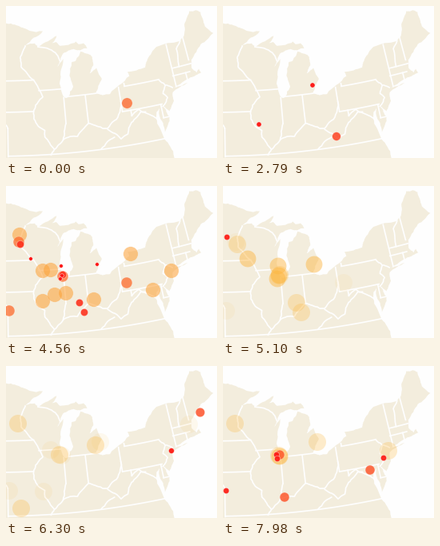
A matplotlib script that plays this animation: 264x190 px, repeating every 8010 ms.

```python
import numpy as np
import matplotlib.pyplot as plt
from matplotlib.animation import FuncAnimation

W, H, DPI = 264, 190, 100
STEP, FRAMES = 30, 267
PX = 72 / DPI
LAND, PAPER = "#f3eddd", "#fefefe"
rng = np.random.default_rng(4)

# Key points as (lon, lat); the small bends between them are random.
LAKES = [
    (-95.1, 49), (-92.9, 48.6), (-91.4, 48.1), (-89.6, 48), (-92.1, 46.75),
    (-90.8, 46.9), (-90.4, 46.57), (-88.9, 47.05), (-87.75, 47.47),
    (-88.45, 46.8), (-87.9, 46.9), (-87.4, 46.5), (-85.2, 46.75),
    (-84.9, 46.47), (-84.2, 46.5), (-83.8, 46), (-84.7, 45.9), (-85.6, 46.08),
    (-87.05, 45.8), (-88, 44.55), (-87.1, 45.25), (-87.55, 44.3), (-87.9, 43),
    (-87.6, 41.85), (-87.3, 41.62), (-86.9, 41.72), (-86.2, 42.6),
    (-86.53, 43.65), (-86.05, 44.9), (-85.55, 44.95), (-85, 45.4),
    (-84.75, 45.78), (-83.5, 45.35), (-83.3, 44.35), (-83.9, 43.65),
    (-82.95, 44.07), (-82.45, 43), (-83.45, 41.72), (-82.7, 41.5),
    (-81.7, 41.5), (-78.9, 42.85), (-79.05, 43.26), (-76.7, 43.35),
    (-76.2, 44.05), (-74.7, 45),
]
OCEAN = [
    (-71.5, 45), (-70.8, 45.4), (-70, 46.7), (-69.23, 47.46), (-68.3, 47.36),
    (-67.8, 47.07), (-67.8, 45.7), (-67, 44.85), (-69, 44.2), (-70.7, 43.05),
    (-70.95, 42.3), (-70.5, 41.78), (-70.1, 42.05), (-69.95, 41.67),
    (-71.4, 41.5), (-73.7, 40.95), (-71.9, 41.07), (-74, 40.55),
    (-74.1, 39.75), (-74.9, 38.93), (-75.5, 39.5), (-75.05, 38.4),
    (-75.95, 37.15), (-76.2, 38.8), (-76, 39.4), (-76.45, 39.1), (-76.3, 37),
    (-75.5, 35.25), (-75.9, 33),
]
RIVERS = [
    # Mississippi, Ohio, Potomac and Delaware
    [(-92.1, 46.7), (-92.85, 45.6), (-92.75, 44.75), (-91.2, 43.5),
     (-90.15, 41.9), (-91.1, 41.2), (-91.4, 39.9), (-90.15, 38.8),
     (-90.2, 38.2), (-89.15, 37), (-89.6, 36.5)],
    [(-89.15, 37), (-88.05, 37.8), (-86.3, 38), (-84.8, 39.1), (-83.6, 38.65),
     (-82.6, 38.4), (-80.85, 39.7), (-80.52, 40.64)],
    [(-79.48, 39.2), (-78.5, 39.65), (-77.05, 38.85), (-76.35, 38)],
    [(-73.9, 41), (-74.7, 41.36), (-75.2, 40.65), (-74.75, 40.2),
     (-75.55, 39.5)],
    # Appalachian ridge, upper Michigan, Wabash, Missouri, Connecticut
    [(-77.75, 39.32), (-78.35, 39.4), (-79.65, 38.6), (-80.3, 37.6),
     (-81.2, 37.25), (-82.6, 38.3)],
    [(-81.95, 37.5), (-83.68, 36.6)],
    [(-90.4, 46.57), (-88.1, 45.9), (-87.6, 45.1)],
    [(-87.53, 39.3), (-88.05, 37.8)],
    [(-94.62, 39.1), (-95.8, 40.58)],
    [(-72.45, 42.73), (-72.3, 43.6), (-71.5, 45)],
    [(-75.35, 42), (-74.7, 41.36)],
]
# (lat, west, east) and (lon, south, north)
PARALLELS = [
    (43.5, -96.5, -91.2), (40.6, -95.8, -91.4), (42.5, -90.6, -87.8),
    (41.75, -87, -83.45), (39.72, -80.52, -75.6), (42, -79.76, -75.35),
    (42.03, -73.5, -71.3), (42.73, -73.25, -70.85), (36.55, -94.62, -75.9),
    (38.45, -75.75, -75.05),
]
MERIDIANS = [
    (-94.62, 36.5, 39.1), (-87.53, 39.3, 41.7), (-84.81, 39.1, 41.7),
    (-80.52, 39.72, 42), (-79.76, 42, 42.27), (-79.48, 39.2, 39.72),
    (-75.75, 38.45, 39.72), (-73.4, 41, 45), (-71.83, 41.3, 42.03),
    (-71.05, 43.1, 45.3),
]

# Openings come in yearly batches; a hub opens again every few years.
START, YEAR, YEARS, LIFE = 915, 151.5, 47, 900
# (x, y, first year, years between)
HUBS = [
    (70, 112, 24, 6), (71, 113, 22, 7), (71, 111, 23, 22), (67, 111, 31, 15),
    (68, 116, 24, 22), (56, 105, 21, 9), (16, 70, 22, 16), (15, 72, 31, 11),
    (112, 99, 12, 19), (114, 98, 24, 14), (118, 95, 30, 12),
    (207, 106, 16, 13), (207, 106, 21, 14), (201, 115, 38, 8),
    (184, 130, 13, 8), (151, 121, -8, 30), (4, 156, 6, 8), (110, 142, 21, 15),
]
# (x, y, year)
TOWNS = [
    (111, 126, 0), (9, 55, 6), (9, 180, 6), (142, 163, 11), (45, 148, 12),
    (17, 61, 21), (156, 85, 21), (46, 106, 21), (46, 144, 21), (61, 136, 21),
    (75, 134, 21), (18, 73, 23), (92, 146, 23), (98, 158, 23), (31, 91, 24),
    (69, 100, 24), (5, 64, 27), (15, 158, 28), (24, 38, 29), (60, 131, 29),
    (132, 111, 29), (47, 157, 30), (229, 73, 30), (19, 178, 31),
    (243, 58, 34), (200, 117, 36), (64, 101, 37), (28, 159, 37),
    (46, 156, 37), (134, 189, 39), (77, 164, 45),
]


def openings():
    spots = TOWNS + [(x, y, year) for x, y, first, gap in HUBS
                     for year in range(first, YEARS, gap)]
    return np.array(sorted(spots, key=lambda s: s[2]), float)


def albers(points):
    """Project lon/lat onto the stage with an equal-area conic."""
    lon, lat = np.radians(np.array(points, float)).T
    s1, s2 = np.sin(np.radians([29.5, 45.5]))
    n = (s1 + s2) / 2
    rho = np.sqrt(1 - s1**2 + 2 * n * s1 - 2 * n * np.sin(lat)) / n
    theta = n * (lon + np.radians(96))
    return np.column_stack([71 + 769 * (rho * np.sin(theta) - 0.10784),
                            112 + 769 * (rho * np.cos(theta) - 1.22139)])


def wander(points, rough=0.05, rounds=3):
    """Roughen a line by shifting midpoints sideways."""
    p = albers(points)
    for _ in range(rounds):
        d = np.diff(p, axis=0)
        side = np.column_stack([-d[:, 1], d[:, 0]])
        mid = p[:-1] + d / 2 + side * rng.normal(0, rough, (len(d), 1))
        p = np.insert(p, np.arange(1, len(p)), mid, axis=0)
    return p


def border(xy):
    ax.plot(*xy.T, color=PAPER, lw=1.7 * PX, solid_joinstyle="round")


fig = plt.figure(figsize=(W / DPI, H / DPI), dpi=DPI, facecolor=PAPER)
ax = fig.add_axes([0, 0, 1, 1])
ax.set(xlim=(0, W), ylim=(H, 0))
ax.axis("off")

corners = albers([(-100, 33), (-100, 49)])
ax.fill(*np.vstack([wander(LAKES + OCEAN), corners]).T, color=LAND, lw=0)
for river in RIVERS:
    border(wander(river))
for lat, west, east in PARALLELS:
    border(albers([(lon, lat) for lon in np.linspace(west, east, 30)]))
for lon, south, north in MERIDIANS:
    border(albers([(lon, south), (lon, north)]))

spots = openings()
born = START + YEAR * spots[:, 2]
dots = ax.scatter([], [], linewidths=0.7 * PX, zorder=5)


def draw(i):
    age = i * STEP - born
    live = (age >= 0) & (age < LIFE)
    age = age[live]
    radius = np.minimum(2.2 + 0.015 * age, 11)
    u = np.clip(age / 600, 0, 1)
    warm = u * u * (3 - 2 * u)
    face = np.column_stack([np.full(len(age), 253), 20 + 165 * warm,
                            20 + 45 * warm, np.zeros(len(age))]) / 255
    face[:, 3] = 1 - (age / LIFE) ** 1.3
    edge = np.ones((len(age), 4))
    edge[:, 3] = 0.6 * (1 - u)
    dots.set_offsets(spots[live, :2])
    dots.set_sizes((2 * radius * PX) ** 2)
    dots.set_facecolors(face)
    dots.set_edgecolors(edge)
    return dots,


anim = FuncAnimation(fig, draw, frames=FRAMES, interval=STEP,
                     repeat=True, repeat_delay=0)
plt.show()
```
